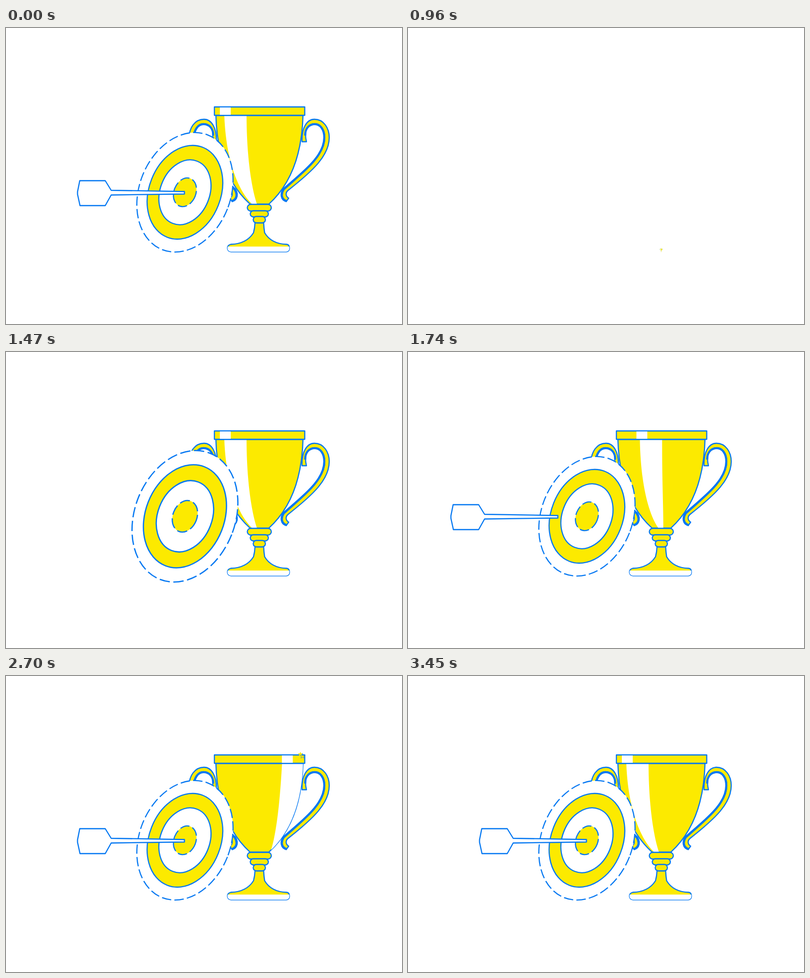
An HTML page that plays this animation: 800x600 px, repeating every 4140 ms.

```html
<!DOCTYPE html>
<html lang="en">
<head>
<meta charset="utf-8">
<title>Target and trophy</title>
<style>
  html, body { margin: 0; width: 100%; height: 100%; overflow: hidden; background: #fff; }
  svg { display: block; width: 800px; height: 600px; }
  .line { stroke: #0578f2; stroke-width: 2.3; stroke-linejoin: round; }
  .gold { fill: #fcea00; }
  .white { fill: #fff; }
  .dash { stroke-dasharray: 19 6.5; }
  .shade { fill: none; stroke: #0578f2; stroke-width: 4.2; stroke-linejoin: round; }
</style>
</head>
<body>
<svg viewBox="0 0 800 600">
  <defs>
    <path id="cup" d="M424 177C426 255 449 317 493 357H531C575 317 598 255 600 177Z"/>
    <path id="foot" d="M503 395Q502.500 406 500 415C490 431 474 438 454 438.500Q447.500 440 447.500 446T454 453.500H566Q572.500 453 572.500 446T567 438.500C547 438 532 431 522.500 415Q521 406 520.500 395Z"/>
    <clipPath id="inCup"><use href="#cup"/></clipPath>
    <clipPath id="inFoot"><use href="#foot"/></clipPath>
    <clipPath id="inRim"><rect x="421" y="161.100" width="183" height="14.800"/></clipPath>
    <g id="handle">
      <path class="line gold" d="M598 230.500C597 204 607 185 623 185C642 185 653 203 653 222C653 258 622 288 570 329C564 334 565 341 571 345L566 352C555 349 553 336 560 326C600 290 644 260 644 222C644 205 635 194 624 194C610 194 601 206 607 230.500Z"/>
      <path class="shade" d="M566 350.500C556 347 555 336 561 327C601 291 643 260 643 222C643 206 635 195 624 195C612 195 604 204 604.500 218"/>
    </g>
  </defs>

  <g id="trophy">
    <use href="#handle"/>
    <use href="#handle" transform="translate(1023 0) scale(-1 1)"/>
    <use href="#foot" class="line gold"/>
    <rect class="white" x="440" y="443" width="140" height="12" clip-path="url(#inFoot)"/>
    <use href="#cup" class="line gold"/>
    <g clip-path="url(#inCup)"><path id="cupShine" class="white"/></g>
    <path class="line" d="M424 177H600"/>
    <rect class="line gold" x="421" y="160" width="182.500" height="17"/>
    <g clip-path="url(#inRim)"><rect id="rimShine" class="white" y="160" width="22" height="18"/></g>
    <rect class="line gold" x="487.500" y="357.500" width="48.500" height="13.500" rx="6.700"/>
    <rect class="line gold" x="493.500" y="370.500" width="36.500" height="12.500" rx="6.200"/>
    <rect class="line gold" x="499.500" y="382" width="24.500" height="13" rx="6.200"/>
  </g>

  <g id="target">
    <g transform="translate(361.500 333) rotate(21.400)">
      <ellipse class="line white dash" rx="92.200" ry="125"/>
      <ellipse class="line gold" rx="72.400" ry="98"/>
      <ellipse class="line white" rx="49.900" ry="67.700"/>
      <ellipse class="line gold dash" rx="22.100" ry="30"/>
    </g>
  </g>

  <g id="dart">
    <path class="line white" d="M149 309.500H200.500L212.500 329L360.500 331.500V336.500L212.500 338.500L200.500 360H149.500L144.500 337V332Z"/>
  </g>

  <g id="star">
    <path class="gold" transform="translate(-12 -8)"/>
    <path class="line" fill="none" transform="translate(4 4)"/>
  </g>
</svg>
<script>
  const LOOP = 4140, STEP = 30;
  const el = id => document.getElementById(id);
  const [trophy, target, dart, star, cupShine, rimShine] =
    ['trophy', 'target', 'dart', 'star', 'cupShine', 'rimShine'].map(el);

  // Tracks are [time, value] pairs, eased in and out between neighbours.
  const shrink = [[0, 1], [180, 1.1], [480, 0]];
  const tracks = {
    trophy: [...shrink, [930, 0], [1290, 1.1], [1470, 1]],
    target: [...shrink, [1110, 0], [1470, 1.1], [1650, 1]],
    dart: [...shrink, [1470, 0], [1470, 1]],
    flight: [[1470, -370], [1830, 0]],
    shine: [[1590, 0], [2160, 1], [2310, 1], [3450, 0]],
    star: [[2580, 0], [2940, 1.05], [3435, 0]]
  };

  function at(track, t) {
    let prev = track[0];
    if (t <= prev[0]) return prev[1];
    for (const next of track) {
      if (t < next[0]) {
        const u = (t - prev[0]) / (next[0] - prev[0]);
        return prev[1] + (next[1] - prev[1]) * u * u * (3 - 2 * u);
      }
      prev = next;
    }
    return prev[1];
  }

  function scaleAt(node, s, x, y, dx = 0) {
    node.style.display = s > 0.001 ? '' : 'none';
    node.setAttribute('transform', `translate(${x + dx} ${y}) scale(${s}) translate(${-x} ${-y})`);
  }

  // Both edges of the highlight bend from left to right as it travels.
  function shinePath(k) {
    const left = [441 + 160 * k, 444 + 150 * k, 465 + 110 * k, 497 + 51 * k];
    const right = [486 + 160 * k, 486 + 158 * k, 496 + 118 * k, 507 + 51 * k];
    return `M${left[0]} 177C${left[1]} 260 ${left[2]} 325 ${left[3]} 357` +
      `H${right[3]}C${right[2]} 325 ${right[1]} 260 ${right[0]} 177Z`;
  }

  const points = Array.from({ length: 10 }, (_, i) => {
    const r = i % 2 ? 9 : 20, a = i * Math.PI / 5;
    return `${(r * Math.sin(a)).toFixed(2)} ${(-r * Math.cos(a)).toFixed(2)}`;
  });
  for (const p of star.children) p.setAttribute('d', `M${points.join('L')}Z`);

  function draw(t) {
    scaleAt(trophy, at(tracks.trophy, t), 511.5, 453.5);
    scaleAt(target, at(tracks.target, t), 361.5, 333);
    scaleAt(dart, at(tracks.dart, t), 361, 333.5, t < 1470 ? 0 : at(tracks.flight, t));
    const k = at(tracks.shine, t);
    cupShine.setAttribute('d', shinePath(k));
    rimShine.setAttribute('x', 432 + 172 * k);
    const s = at(tracks.star, t);
    star.style.display = s > 0.001 ? '' : 'none';
    star.setAttribute('transform', `translate(598 161) scale(${s})`);
  }

  const start = performance.now();
  function tick() {
    const t = (performance.now() - start) % LOOP;
    draw(Math.floor(t / STEP) * STEP);
    requestAnimationFrame(tick);
  }
  draw(0);
  requestAnimationFrame(tick);
</script>
</body>
</html>
```
